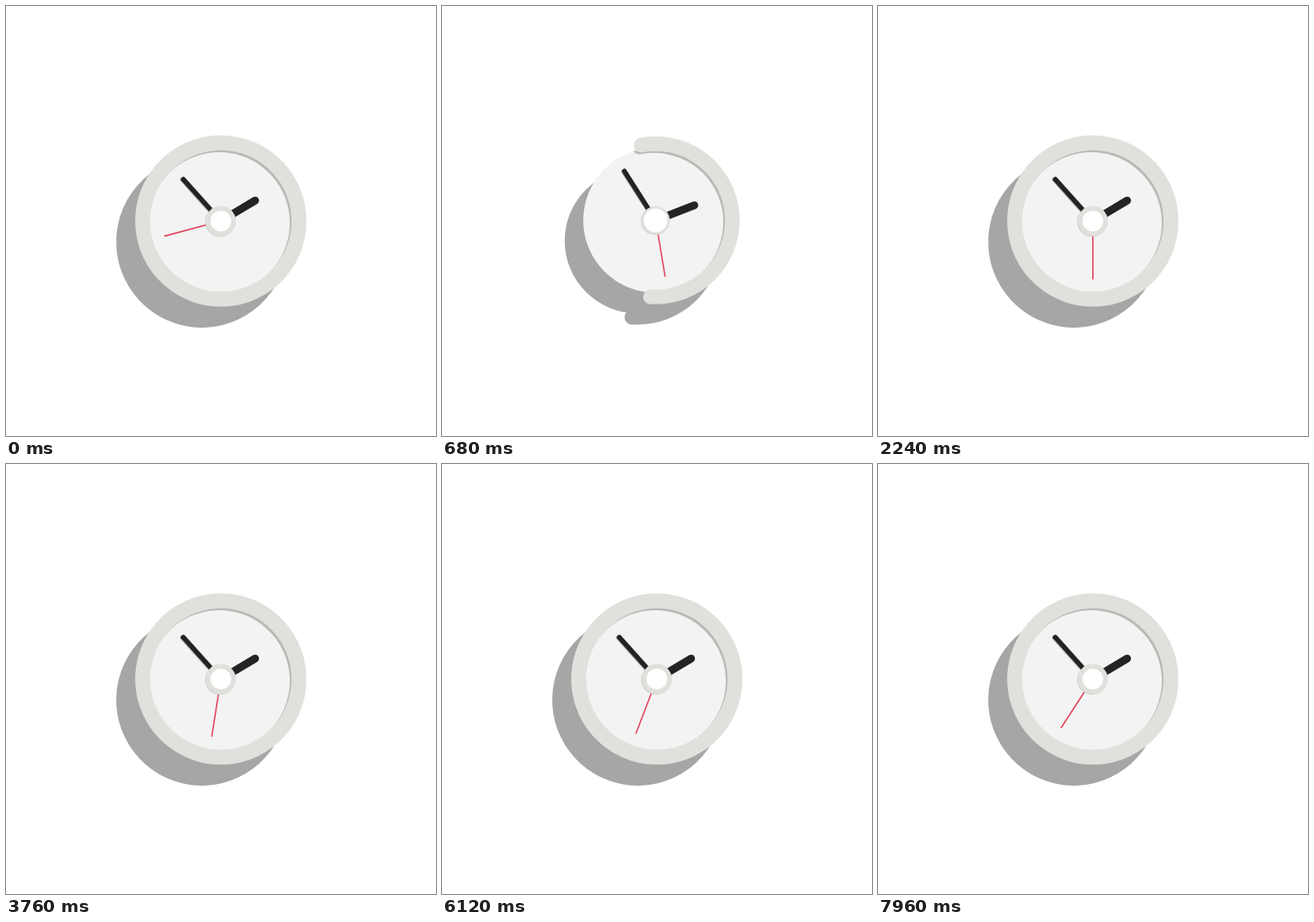
An HTML page with a canvas that plays this animation: 500 px wide and 500 px high, repeating every 8 s.

```html
<!DOCTYPE html>
<html lang="en">
<head>
<meta charset="utf-8">
<title>Clock</title>
<style>
  html, body { margin: 0; width: 100%; height: 100%; overflow: hidden; background: #fff; }
  canvas { display: block; width: 100vw; height: 100vh; }
</style>
</head>
<body>
<canvas id="stage" width="500" height="500"></canvas>
<script>
const ctx = document.getElementById('stage').getContext('2d');
const LOOP = 8000, FIRST_TICK = 3130, TAU = Math.PI * 2;
const rad = degrees => (degrees - 90) * Math.PI / 180;

// Smooth interpolation through [time, value] points.
function track(t, ...points) {
  if (t <= points[0][0]) return points[0][1];
  for (let i = 1; i < points.length; i++) {
    const [t0, v0] = points[i - 1], [t1, v1] = points[i];
    if (t < t1) {
      const u = (t - t0) / (t1 - t0);
      return v0 + (v1 - v0) * u * u * (3 - 2 * u);
    }
  }
  return points[points.length - 1][1];
}

const elasticOut = u => u <= 0 ? 0 : 1 + 2 ** (-10 * u) * Math.sin((u - 0.075) * TAU / 0.3);

function secondAngle(t) {
  if (t < 680) return track(t, [40, 0], [680, 170.5]);
  if (t < FIRST_TICK) return 183 - 12.5 * (1 - (t - 680) / (FIRST_TICK - 680)) ** 1.4;
  const ticks = (t - FIRST_TICK) / 1000, whole = Math.floor(ticks);
  return 183 + 6 * (whole + elasticOut(ticks - whole));
}

function disc(radius, color, x = 0, y = 0) {
  ctx.fillStyle = color;
  ctx.beginPath();
  ctx.arc(x, y, Math.max(0, radius), 0, TAU);
  ctx.fill();
}

function ring(span, color, x = 0, y = 0) {
  if (span <= 0) return;
  ctx.strokeStyle = color;
  ctx.lineWidth = 17.4;
  ctx.lineCap = 'round';
  ctx.beginPath();
  ctx.arc(x, y, 90.9, rad(86.5 - span / 2), rad(86.5 + span / 2));
  ctx.stroke();
}

function hand(angle, length, width, color, cap = 'round', x = 0, y = 0) {
  if (length <= 0) return;
  ctx.strokeStyle = color;
  ctx.lineWidth = width;
  ctx.lineCap = cap;
  ctx.beginPath();
  ctx.moveTo(x, y);
  ctx.lineTo(x + length * Math.cos(rad(angle)), y + length * Math.sin(rad(angle)));
  ctx.stroke();
}

function draw(t) {
  const scale = track(t, [40, 0], [280, 1], [680, 0.98], [1300, 1.003], [1650, 1]);
  const lift = track(t, [40, 0], [280, 2.03], [560, 1]);
  const span = track(t, [280, 0], [1040, 360]);
  const reach = track(t, [240, 0], [680, 1.06], [1900, 1]);
  const swing = track(t, [240, 60], [680, 9.5], [1900, 0]);
  const settle = track(t, [680, 0], [1400, 1]);
  const shadowX = -22 * lift, shadowY = 24.3 * lift;

  ctx.setTransform(1, 0, 0, 1, 0, 0);
  ctx.fillStyle = '#fff';
  ctx.fillRect(0, 0, 500, 500);
  if (scale <= 0) return;
  ctx.translate(248.5 + 1.3 * settle, 249.2 + 0.8 * settle);
  ctx.scale(scale, scale);

  disc(86, '#a6a6a6', shadowX, shadowY);
  ring(span, '#a6a6a6', shadowX, shadowY);
  disc(86, '#f3f3f3');

  // The ring's shadow falls only on the dial.
  ctx.save();
  ctx.beginPath();
  ctx.arc(0, 0, 86, 0, TAU);
  ctx.clip();
  ring(span, '#b9bab5', -2, 2.2);
  ctx.restore();
  ring(span, '#e0e1dc');

  const hour = 59.2 + swing, minute = -42 + swing;
  hand(hour, 46.5 * reach, 9, '#a0a0a0', 'round', -0.7, 0.7);
  hand(hour, 46.5 * reach, 9, '#232323');
  hand(minute, 65.3 * reach, 5.6, '#a0a0a0', 'round', -0.7, 0.7);
  hand(minute, 65.3 * reach, 5.6, '#232323');
  hand(secondAngle(t), 68 * Math.min(1, reach), 1.6, '#e2455d', 'butt');

  const hub = track(t, [120, 0], [500, 16.6], [1400, 17.5]);
  disc(hub, '#cfd0cb', -0.8, 0.8);
  disc(hub, '#e0e1dc');
  disc(hub - track(t, [680, 2.6], [1400, 5.5]), '#fff');
}

function frame(now) {
  const t = now % LOOP;
  // The loop opens on the last moment of a long-running clock, then cuts to the intro.
  draw(t < 40 ? t + 15000 : t);
  requestAnimationFrame(frame);
}
draw(15000);
requestAnimationFrame(frame);
</script>
</body>
</html>
```
